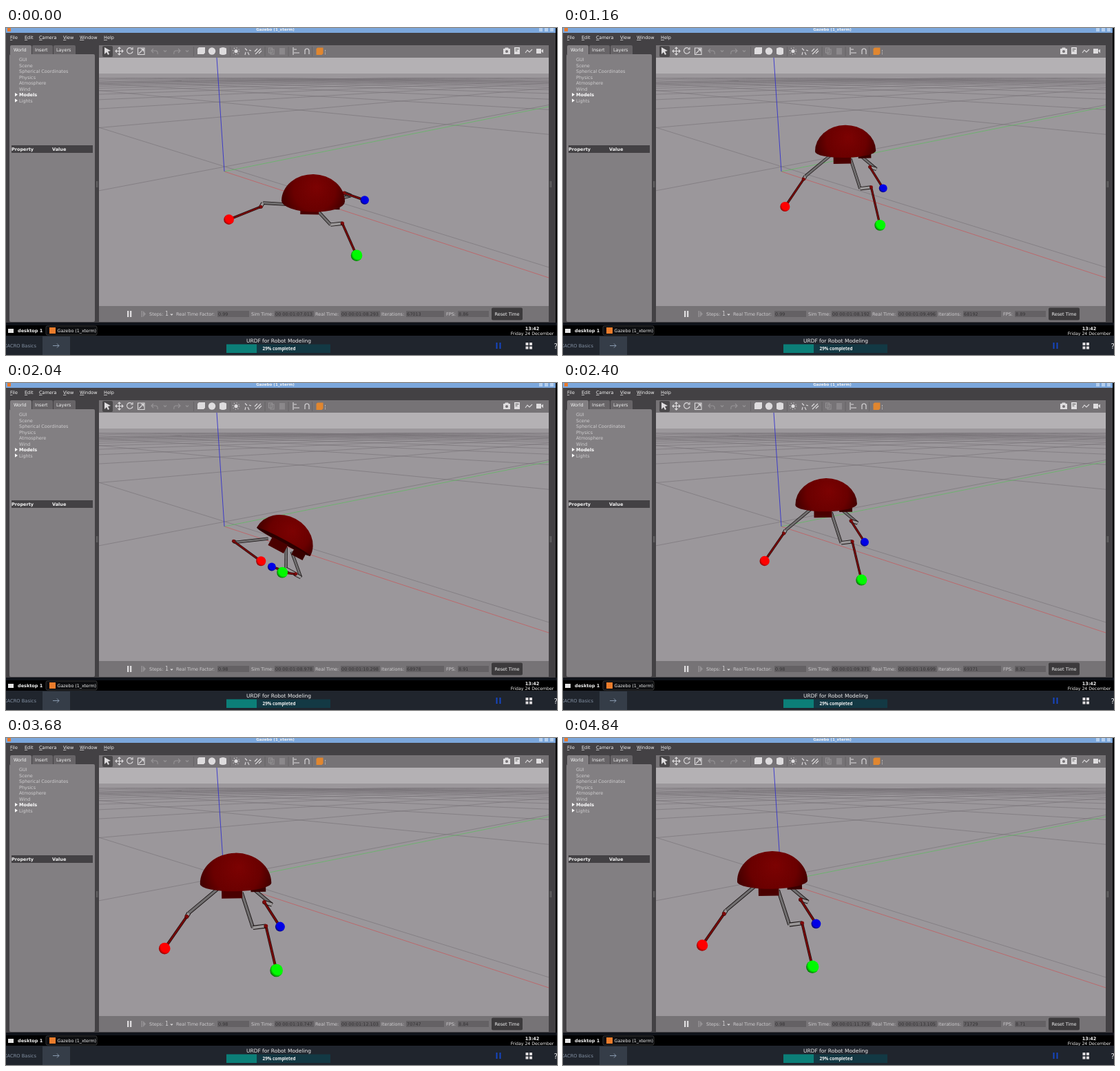
An HTML page with a canvas that plays this animation: 800 by 474 pixels, repeating every 4880 ms.

```html
<!DOCTYPE html>
<html lang="en">
<head>
<meta charset="utf-8">
<title>Robot simulation</title>
<style>
html, body { margin: 0; width: 100%; height: 100%; overflow: hidden; background: #000; }
svg, canvas { position: absolute; left: 0; top: 0; width: 800px; height: 474px; }
text { font: 6.5px "DejaVu Sans", sans-serif; fill: #f2f2f2; white-space: pre; }
.b { font-weight: bold; }
.dim text { fill: #cfcdcf; }
.val text { fill: #363436; }
.icon { fill: none; stroke: #dedcde; stroke-width: 1.1; }
.off { stroke: #959395; }
.solid { fill: #dedcde; stroke: none; }
</style>
</head>
<body>
<svg viewBox="0 0 800 474">
  <defs>
    <clipPath id="view"><rect x="135" y="43" width="653" height="360"/></clipPath>
    <clipPath id="ground"><rect x="135" y="72" width="653" height="331"/></clipPath>
  </defs>

  <rect width="798" height="427" fill="#434144"/>
  <rect width="798" height="7" fill="#7ba7dc"/>
  <rect x="2" y="0" width="5" height="5" fill="#e8792b"/>
  <text class="b" x="391" y="4" text-anchor="middle" style="font-size:5.6px">Gazebo (1_xterm)</text>
  <path d="M774 0h5v5h-5zM782 0h5v5h-5zM790 0h5v5h-5z" fill="#b5cfee"/>
  <g id="menu"></g>

  <path d="M6 38V27q0-2 2-2h27q2 0 2 2v11z" fill="#827f82"/>
  <path d="M38 38V27q0-2 2-2h26q2 0 2 2v11zM69 38V27q0-2 2-2h28q2 0 2 2v11z" fill="#676467"/>
  <rect x="5" y="38" width="124" height="388" rx="2" fill="#827f82"/>
  <text x="11" y="34">World</text><text x="42" y="34">Insert</text><text x="73" y="34">Layers</text>
  <g id="tree" class="dim"></g>
  <path d="M13 94l4 2.600-4 2.600zM13 102.500l4 2.600-4 2.600z" fill="#fff"/>
  <rect x="8" y="170" width="118" height="11" fill="#434144"/>
  <text class="b" x="8" y="178">Property</text><text class="b" x="67" y="178">Value</text>
  <path d="M131.500 222v9M133 222v9M790 222v9M791.500 222v9" stroke="#777" stroke-width=".7"/>

  <rect x="135" y="25" width="653" height="18" fill="#767376"/>
  <rect x="140" y="26" width="15" height="16" rx="2" fill="#4a484a"/>
  <path class="solid" d="M143 28l9 5-4 1 2 4-2 1-2-4-3 3z"/>
  <path class="icon" d="M159.500 33.500h10M164.500 28.500v10M162.500 30l2-2 2 2M162.500 37l2 2 2-2M161 31.500l-2 2 2 2M168 31.500l2 2-2 2"/>
  <path class="icon" d="M183 30a4.300 4.300 0 1 0 1 4M184 28v3h-3"/>
  <path class="icon" d="M191.500 29h9.500v9.500h-9.500zM193 37l6.500-6.500M196 30.500h3.500v3.500"/>
  <path class="icon off" d="M212 33h6q3 1 2 5M214 30l-3 3 3 3M229 32.500l2 2 2-2M252 33h-6q-3 1-2 5M250 30l3 3-3 3M261 32.500l2 2 2-2"/>
  <path d="M272.500 27v14M325.500 27v14M376 27v14M410 27v14M444.500 27v14" stroke="#636063" stroke-width=".8"/>
  <path class="solid" d="M278 30l2-2h9v8l-2 2h-9zM310 29.500q5-3 10 0v8q-5 3-10 0z"/>
  <circle class="solid" cx="299" cy="33.500" r="5.200"/>
  <circle class="solid" cx="334" cy="33.500" r="2.600"/>
  <circle class="icon" cx="334" cy="33.500" r="4.700" stroke-dasharray="1 2.690"/>
  <path class="icon" d="M347 29.500l3 3M351 35l2 4M348 35l-1 4M353 32l3 1M361 34l4-4M362 38l8-8M367 37l4-4"/>
  <path class="icon off" d="M381.500 29h5v7h-5zM384 31h5v7h-5z"/>
  <rect x="397" y="29" width="8" height="9.500" fill="#8b888b"/>
  <path class="icon" d="M417 28v11M418 31h4M418 36h8"/>
  <path class="icon" d="M434 38v-5a3 3 0 0 1 6 0v5" stroke-width="2"/>
  <path d="M450.500 30l2-1.500h8v8.500l-2 2h-8z" fill="#e0862f"/>
  <path d="M463.500 32v7" stroke="#ddd" stroke-dasharray="1 1.500"/>
  <path class="solid" d="M722 30h2l1-1.500h4l1 1.500h2v8h-10z"/>
  <circle cx="727" cy="34" r="2" fill="#767376"/>
  <path class="solid" d="M738 28h8v10h-8z"/><path d="M739.500 30.500h5M739.500 33h3" stroke="#555"/>
  <path class="icon" d="M754 36l3-4 3 3 4-4"/>
  <path class="solid" d="M770 30h7v7h-7zM777 33l3-2.500v6z"/>

  <g clip-path="url(#view)">
    <rect x="135" y="43" width="653" height="360" fill="#9b979b"/>
    <rect x="135" y="43" width="653" height="23" fill="#b4b1b4"/>
    <path id="grid" clip-path="url(#ground)" stroke="#6f6b6f" stroke-width=".6" opacity=".85"/>
    <path d="M317 208L788 362" stroke="#c95558" stroke-width=".7"/>
    <path d="M317 208L788 114" stroke="#5bbd5d" stroke-width=".7"/>
    <path d="M306 43L317 208" stroke="#3230cc" stroke-width=".9"/>
  </g>

  <rect x="135" y="403" width="653" height="23" fill="#767376"/>
  <path class="solid" d="M176 410h2.300v9H176zM180 410h2.300v9H180z"/>
  <path d="M196.500 410h1.500v9h-1.500zM199 410l4 4.500-4 4.500z" fill="#959295"/>
  <g class="dim">
    <text x="208" y="417">Steps:</text><text x="231" y="417" style="font-size:8px">1</text>
    <text x="247" y="417">Real Time Factor:</text><text x="356" y="417">Sim Time:</text>
    <text x="449" y="417">Real Time:</text><text x="545" y="417">Iterations:</text><text x="639" y="417">FPS:</text>
  </g>
  <path class="icon" d="M239 414.500l1.500 1.500 1.500-1.500" stroke-width=".8"/>
  <path d="M307 410h46v9h-46zM390 410h57v9h-57zM486 410h57v9h-57zM581 410h55v9h-55zM656 410h45v9h-45z" fill="#646164"/>
  <g class="val">
    <text id="rtf" x="308" y="417"></text><text id="sim" x="391" y="417"></text>
    <text id="real" x="487" y="417"></text><text id="iter" x="582" y="417"></text><text id="fps" x="657" y="417"></text>
  </g>
  <rect x="705" y="405.500" width="45" height="18" rx="2" fill="#3c3a3c"/>
  <text x="727.500" y="417" text-anchor="middle">Reset Time</text>

  <rect y="427" width="800" height="4" fill="#10131a"/>
  <rect y="431" width="800" height="15" fill="#000"/>
  <rect x="3" y="436" width="8" height="6" fill="#e4e4e4"/>
  <text class="b" x="17" y="441">desktop 1</text>
  <rect x="58" y="432" width="74" height="13" rx="2" fill="#0d0e10" stroke="#4a4a4a" stroke-width=".7"/>
  <rect x="63" y="434" width="9" height="9" fill="#ec7d2c"/>
  <text x="74.500" y="441" style="font-size:6.3px">Gazebo (1_xterm)</text>
  <text class="b" x="764" y="438" text-anchor="middle">13:42</text>
  <text x="764" y="444.500" text-anchor="middle" style="font-size:6.2px">Friday 24 December</text>

  <rect y="446" width="800" height="28" fill="#20252d"/>
  <text x="-3" y="463" style="font-size:6.7px;fill:#8492a4">XACRO Basics</text>
  <rect x="53" y="447" width="40" height="27" fill="#353d48"/>
  <path d="M68 460.500h9M74 457.500l3 3-3 3" fill="none" stroke="#8798ad"/>
  <text x="396" y="456" text-anchor="middle" style="font-size:7.500px">URDF for Robot Modeling</text>
  <rect x="320" y="458.500" width="151" height="12.500" fill="#133944"/>
  <rect x="320" y="458.500" width="44" height="12.500" fill="#0c7f78"/>
  <text x="396.500" y="467" text-anchor="middle" style="font:600 6.300px 'Noto Sans',sans-serif">29% completed</text>
  <path d="M711.500 456h2v9h-2zM716.500 456h2v9h-2z" fill="#1546c4"/>
  <path class="solid" d="M754.500 456h4v4h-4zM760 456h4v4h-4zM754.500 461.500h4v4h-4zM760 461.500h4v4h-4z"/>
  <text x="795.500" y="464.500" style="font-size:10px">?</text>
</svg>
<canvas id="robot" width="800" height="474"></canvas>

<script>
const LOOP = 4880, STEP = 40;
const $ = id => document.getElementById(id);
const ctx = $('robot').getContext('2d');

function addText(parent, x, y, str, cls = '') {
  const el = document.createElementNS('http://www.w3.org/2000/svg', 'text');
  el.setAttribute('x', x);
  el.setAttribute('y', y);
  el.setAttribute('class', cls);
  el.innerHTML = str;
  $(parent).append(el);
}

const menuX = { File: 6, Edit: 27, Camera: 48, View: 83, Window: 107, Help: 142 };
for (const [name, x] of Object.entries(menuX))
  addText('menu', x, 16, `<tspan text-decoration="underline">${name[0]}</tspan>${name.slice(1)}`);
['GUI', 'Scene', 'Spherical Coordinates', 'Physics', 'Atmosphere', 'Wind', 'Models', 'Lights']
  .forEach((name, i) => addText('tree', 19, 48 + i * 8.5, name, name === 'Models' ? 'b' : ''));
$('tree').children[6].style.fill = '#fff';

// Ground grid: each family of lines meets at its own vanishing point.
function gridPath() {
  const origin = [318, 201], left = [-117, 66], right = [1027, 66];
  const toward = (vp, s) => origin.map((o, i) => (o + s * vp[i]) / (1 + s));
  const line = (vp, p) => `M${vp}L${p.map((v, i) => vp[i] + (v - vp[i]) * 12)}`;
  let d = '';
  for (let k = 0; k <= 11; k++)
    d += line(left, toward(right, 0.83 * k)) + line(right, toward(left, 0.72 * k));
  return d;
}
$('grid').setAttribute('d', gridPath());

// The robot hops from one crouch to the next, stretching its legs in the air.
// Angles in degrees; hip and knee are the pitch of the two links below level.
const crouches = [
  { t: 0,    x: 446, y: 251, r: 46,   tilt: 1,  yaw: 0,  view: 20, hip: -1,  knee: 25 },
  { t: 720,  x: 427, y: 248, r: 44.5, tilt: -8, yaw: 0,  view: -8, hip: 5,   knee: 156 },
  { t: 2040, x: 403, y: 230, r: 44,   tilt: 28, yaw: 0,  view: -4, hip: 34,  knee: 172 },
  { t: 2840, x: 378, y: 253, r: 45,   tilt: 11, yaw: 18, view: 20, hip: -11, knee: 152 },
  { t: 4080, x: 332, y: 259, r: 52,   tilt: 3,  yaw: 6,  view: 14, hip: 0,   knee: 152 },
  { t: 5200, x: 303, y: 251, r: 51,   tilt: 0,  yaw: 0,  view: 14, hip: 0,   knee: 152 },
];
const stretched = { tilt: -1, yaw: 0, view: 13, hip: 40, knee: 55 };
const HOP = 65;

const mix = (a, b, u) => a + (b - a) * u;
const smooth = u => (u = Math.min(1, Math.max(0, u)), u * u * (3 - 2 * u));
const rad = deg => deg * Math.PI / 180;

function poseAt(t) {
  const i = crouches.findIndex(c => c.t > t) - 1;
  const a = crouches[i], b = crouches[i + 1];
  const p = (t - a.t) / (b.t - a.t), glide = 1 - (1 - p) ** 3;
  const airborne = i > 0;
  const stretch = airborne ? smooth(p / 0.35) * smooth((1 - p) / 0.32) : 0;
  const lift = airborne ? HOP * Math.sin(Math.PI * p ** 0.75) : 0;
  const pose = { x: mix(a.x, b.x, glide), y: mix(a.y, b.y, p) - lift, r: mix(a.r, b.r, glide) };
  for (const key in stretched)
    pose[key] = mix(mix(a[key], b[key], smooth(p)), stretched[key], stretch);
  return pose;
}

// Body space to screen: x right, z up, depth toward the viewer, in body radii.
function project({ x, y, r, tilt, view }, px, depth, pz) {
  const v = rad(view), a = rad(tilt), scale = r / (1 - 0.08 * depth);
  const sx = px * scale, sy = (depth * Math.sin(v) - pz * Math.cos(v)) * scale;
  return [x + sx * Math.cos(a) - sy * Math.sin(a), y + sx * Math.sin(a) + sy * Math.cos(a)];
}

function legPoints(pose, azimuth) {
  const LINK = 1.1, MOTOR = 0.35, a = rad(azimuth + pose.yaw);
  const at = (out, z, side) => project(pose,
    out * Math.cos(a) + side * Math.sin(a), out * Math.sin(a) - side * Math.cos(a), z);
  const h = rad(pose.hip), k = rad(pose.knee);
  const out = 0.5 + LINK * Math.cos(h), z = -0.15 - LINK * Math.sin(h);
  return {
    hip: at(0.5, -0.15, 0),
    knee: at(out, z, 0),
    joint: at(out, z, MOTOR),
    foot: at(out + LINK * Math.cos(k), z - LINK * Math.sin(k), MOTOR),
  };
}

function rod(p, q, width, color) {
  for (const [w, c] of [[width, '#1b1515'], [width * 0.65, color]]) {
    ctx.lineWidth = w;
    ctx.strokeStyle = c;
    ctx.beginPath();
    ctx.moveTo(...p);
    ctx.lineTo(...q);
    ctx.stroke();
  }
}

function ball([x, y], r, light, dark) {
  const g = ctx.createRadialGradient(x + r * 0.3, y - r * 0.3, r * 0.5, x + r * 0.2, y - r * 0.2, r * 1.3);
  g.addColorStop(0, light);
  g.addColorStop(0.5, light);
  g.addColorStop(1, dark);
  ctx.fillStyle = g;
  ctx.beginPath();
  ctx.arc(x, y, r, 0, 7);
  ctx.fill();
}

function inBody({ x, y, r, tilt }, draw) {
  ctx.save();
  ctx.translate(x, y);
  ctx.rotate(rad(tilt));
  ctx.scale(r, r);
  draw();
  ctx.restore();
}

function drawBoxes(pose) {
  inBody(pose, () => {
    ctx.fillStyle = '#4a0000';
    ctx.fillRect(-0.4, 0.03, 0.58, pose.view < 0 ? 0.31 : 0.39);
    ctx.fillStyle = '#380000';
    ctx.fillRect(0.42, 0, 0.42, 0.25);
  });
}

function drawDome(pose) {
  const rim = Math.abs(Math.sin(rad(pose.view)));
  inBody(pose, () => {
    const g = ctx.createRadialGradient(0.1, -0.45, 0, 0, -0.3, 1.1);
    g.addColorStop(0, '#7c0202');
    g.addColorStop(0.6, '#6a0000');
    g.addColorStop(1, '#3c0000');
    ctx.fillStyle = g;
    ctx.beginPath();
    ctx.ellipse(0, 0, 1, 0.85, 0, Math.PI, 0);
    ctx.ellipse(0, 0, 1, rim, 0, 0, Math.PI);
    ctx.fill();
    if (pose.view >= 0) return;
    ctx.fillStyle = '#2c0000';
    ctx.beginPath();
    ctx.ellipse(0, 0, 1, rim, 0, 0, 7);
    ctx.fill();
  });
}

const legs = [
  { azimuth: -37, size: 0.135, light: '#0000e6', dark: '#000060' },
  { azimuth: 184, size: 0.16, light: '#ff0000', dark: '#800000' },
  { azimuth: 72, size: 0.18, light: '#00fa00', dark: '#006000' },
];

function drawUpper(leg, k) {
  rod(leg.hip, leg.knee, 4.6 * k, '#716f70');
}

function drawLower(leg, k) {
  rod(leg.knee, leg.joint, 5.5 * k, '#9a9798');
  rod(leg.joint, leg.foot, 3.5 * k, '#760808');
  ball(leg.joint, 2.6 * k, '#7c0a0a', '#240000');
  ball(leg.foot, leg.r, leg.light, leg.dark);
}

function drawRobot(t) {
  const pose = poseAt(t), k = pose.r / 46;
  const [far, ...near] = legs.map(leg => ({ ...leg, ...legPoints(pose, leg.azimuth), r: leg.size * pose.r }));
  const upper = leg => drawUpper(leg, k), lower = leg => drawLower(leg, k);

  ctx.clearRect(0, 0, 800, 474);
  if (pose.view < 0) drawDome(pose);
  upper(far);
  lower(far);
  near.forEach(upper);
  drawBoxes(pose);
  if (pose.view >= 0) drawDome(pose);
  near.forEach(lower);
}

// The readouts refresh about five times a second.
const clock = ms => `00 00:01:${((ms - 60000) / 1000).toFixed(3).padStart(6, '0')}`;

function drawReadouts(t) {
  const n = Math.min(24, Math.floor(0.235 + t * 0.0052));
  const sim = Math.floor(67013 + n * 196.53);
  $('rtf').textContent = n < 9 ? '0.99' : '0.98';
  $('sim').textContent = clock(sim);
  $('real').textContent = clock(Math.floor(68293 + n * 200.53));
  $('iter').textContent = sim;
  $('fps').textContent = (8.86 + n * 0.005 - Math.max(0, n - 15) * 0.03).toFixed(2);
}

const start = performance.now();
function frame() {
  const elapsed = (performance.now() - start) % LOOP;
  const t = Math.floor(elapsed / STEP) * STEP;
  drawRobot(t);
  drawReadouts(t);
  requestAnimationFrame(frame);
}
frame();
</script>
</body>
</html>
```
